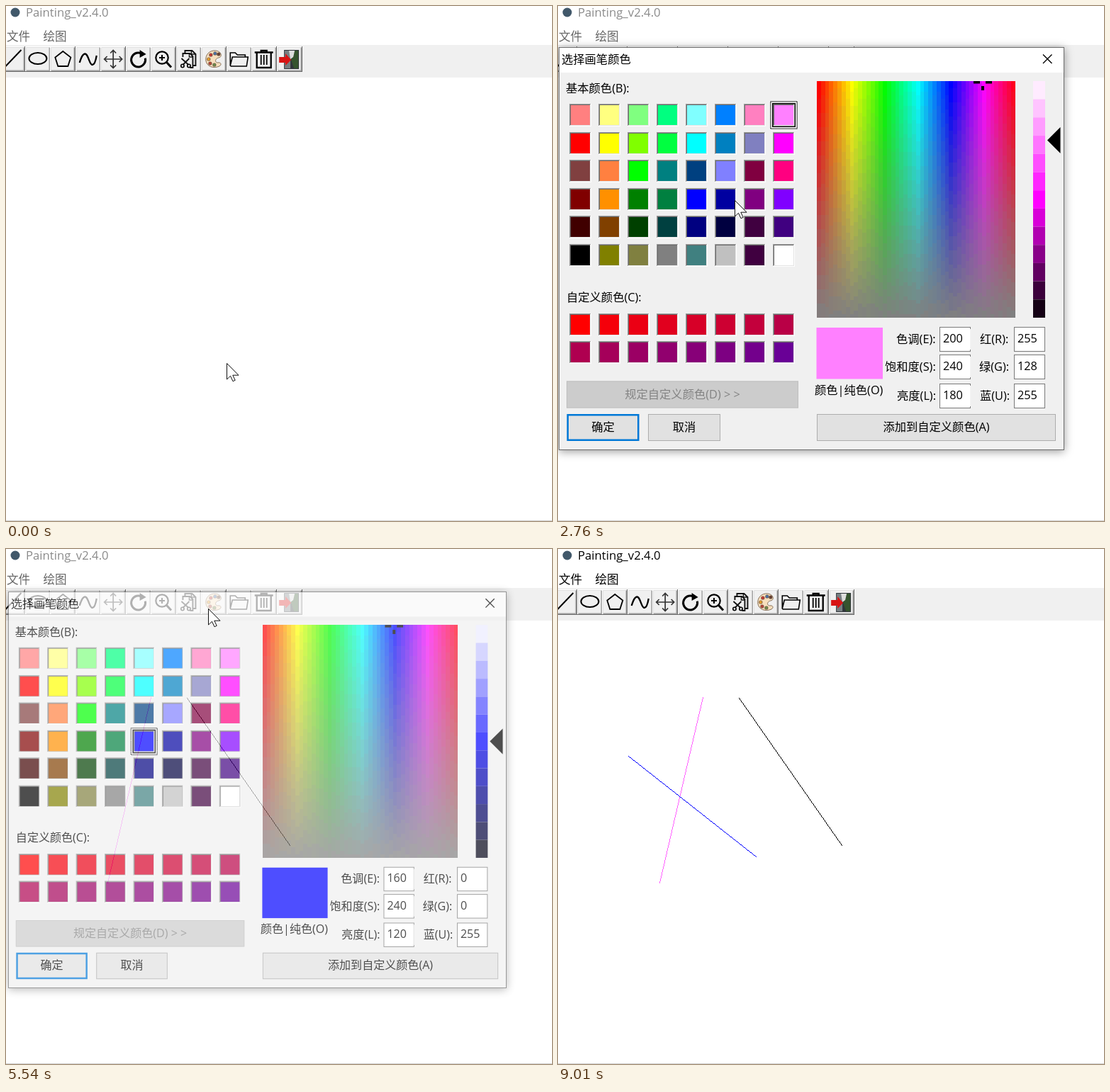
These frames come from a looping animation (770 by 727 pixels, 9390 ms). An HTML page with a canvas:

```html
<!DOCTYPE html>
<html lang="zh">
<head>
<meta charset="utf-8">
<title>Painting</title>
<style>
html, body { margin: 0; width: 100%; height: 100%; overflow: hidden; background: #fff; }
canvas { display: block; }
</style>
</head>
<body>
<canvas id="stage" width="770" height="727"></canvas>
<script>
const W = 770, H = 727, LOOP = 9390, STEP = LOOP / 75;
const FONT = "'Open Sans', 'Noto Sans CJK SC', 'Noto Sans CJK', sans-serif";
const screen = document.getElementById('stage').getContext('2d');
const layer = newCanvas(W, H);
let g = screen;

function newCanvas(w, h) {
  const c = document.createElement('canvas');
  c.width = w;
  c.height = h;
  return c;
}

// ---------- drawing helpers ----------
function rect(x, y, w, h, fill) {
  g.fillStyle = fill;
  g.fillRect(x, y, w, h);
}
function frame(x, y, w, h, color, lw = 1) {
  g.strokeStyle = color;
  g.lineWidth = lw;
  g.strokeRect(x + lw / 2, y + lw / 2, w - lw, h - lw);
}
function text(s, x, y, color = '#000', size = 16.3, align = 'left') {
  g.font = size + 'px ' + FONT;
  g.textAlign = align;
  g.fillStyle = color;
  g.fillText(s, x, y);
}
function stroke(d, color = '#000', lw = 2) {
  g.strokeStyle = color;
  g.lineWidth = lw;
  g.stroke(new Path2D(d));
}
function shape(d, fill) {
  g.fillStyle = fill;
  g.fill(new Path2D(d));
}
function dot(x, y, r, fill) {
  g.fillStyle = fill;
  g.beginPath();
  g.arc(x, y, r, 0, 7);
  g.fill();
}
function ring(x, y, r, lw, from = 0, to = 2 * Math.PI) {
  g.strokeStyle = '#000';
  g.lineWidth = lw;
  g.beginPath();
  g.arc(x, y, r, from, to);
  g.stroke();
}
// One square per step, without smoothing
function pixelLine([x0, y0], [x1, y1], color) {
  const n = Math.max(Math.abs(x1 - x0), Math.abs(y1 - y0), 1);
  for (let i = 0; i <= n; i++) {
    rect(Math.round(x0 + (x1 - x0) * i / n), Math.round(y0 + (y1 - y0) * i / n), 1, 1, color);
  }
}

// ---------- toolbar: each icon is centred on 0,0 ----------
const icons = [
  () => stroke('M-11 11L12 -13'),
  () => { g.beginPath(); g.ellipse(0, -1, 12.5, 8, 0, 0, 7); g.strokeStyle = '#000'; g.lineWidth = 2; g.stroke(); },
  () => stroke('M0 -11L11 -2.5L7 10H-7L-11 -2.5Z', '#000', 1.8),
  () => stroke('M-12 5C-9 -5 -6 -9 -3 -7C1 -4 2 8 6 8C9 8 11 1 12 -5', '#000', 2.3),
  () => {
    for (let i = 0; i < 4; i++) {
      stroke('M0 0V-12M-4 -8.5L0 -12.5L4 -8.5', '#333', 1.7);
      g.rotate(Math.PI / 2);
    }
  },
  () => { ring(0, 1, 10, 3, -0.25, 5.2); shape('M2 -13L11 -7L2 -2Z', '#000'); },
  () => { ring(-2, -2, 8.7, 2.2); stroke('M-6 -2H2M-2 -6V2', '#000', 2); stroke('M4 4L11 11.5', '#000', 3); },
  () => {
    stroke('M-5 -7V-12H5L10 -7V9H7M-8 -3V-8H2L6 -4V12H2', '#111', 1.9);
    stroke('M4 -12V-7H10M1 -8V-3H6', '#111', 1.4);
    stroke('M-10 -1L0 8M1 -1L-8 8', '#111', 1.8);
    ring(-8.5, 9.5, 2.2, 1.6);
    ring(0.5, 9.5, 2.2, 1.6);
  },
  () => {
    const blob = 'M3 -12C-6 -13 -12 -6 -11 2C-10 10 -1 14 8 10C12 8 10 4 6 5C1 5 2 -1 7 -2C13 -3 11 -11 3 -12Z';
    shape(blob, palettePressed ? '#ffe872' : '#f7dfbd');
    stroke(blob, '#86715b', 1);
    [['#4a72a8', 2, -8], ['#c83c32', -4, -6], ['#e6a02c', -7, 0], ['#b84538', -5, 6],
     ['#6d8c48', 1, 8], ['#684030', 7, -7]].forEach(([c, x, y]) => {
      dot(x, y, 2.6, '#6a5547');
      dot(x, y, 1.9, palettePressed && c !== '#4a72a8' ? '#f5cc20' : c);
    });
  },
  () => stroke('M-12 9V-9H-5L-2 -6H9V-3M-12 9L-9 -3H13L11 10H-11Z', '#000', 1.6),
  () => {
    stroke('M-13 -9.5H13', '#000', 2.5);
    stroke('M-4 -10V-12H4V-10M-10 -9V12H10V-9', '#000', 2.3);
    stroke('M-4 -6V8M0 -6V8M4 -6V8', '#000', 1.8);
  },
  () => {
    rect(-7, -13, 21, 27, '#30353a');
    rect(-6, -12, 8, 25, '#777f82');
    shape('M2 -12H13V13H7L2 -2Z', '#35542e');
    shape('M0 -12H8L6 -3L2 0Z', '#dedede');
    shape('M-14 -3H-5V-8L3 1L-5 9V5H-14Z', '#d81414');
  }
];
let palettePressed = false;

function toolbar() {
  rect(0, 55, W, 46, '#f0f0f0');
  icons.forEach((icon, i) => {
    const x = Math.round(-9 + 35.5 * i), down = palettePressed && i === 8;
    rect(x, 57, 36, 36, down ? '#fff' : '#696969');
    rect(x, 57, 35, 35, down ? '#696969' : '#fff');
    rect(x + 1.5, 58.5, 33.5, 33.5, down ? '#f0f0f0' : '#a0a0a0');
    rect(x + 1.5, 58.5, 32, 32, '#f0f0f0');
    g.save();
    g.translate(9.5 + 35.42 * i + (down ? 2 : 0), 75 + (down ? 1.5 : 0));
    icon();
    g.restore();
  });
}

function mainWindow(titleOn, menuOn) {
  rect(0, 0, W, H, '#fff');
  dot(13, 9, 6.5, '#41586a');
  text('Painting_v2.4.0', 28, 15, titleOn ? '#000' : '#8a8a8a', 16.7);
  text('文件', 1, 49, menuOn ? '#000' : '#666', 16.6);
  text('绘图', 52.5, 49, menuOn ? '#000' : '#666', 16.6);
  toolbar();
  rect(0, 726, W, 1, '#d4d4d4');
}

// ---------- colour dialog ----------
// One digit per channel, in sixteenths
const basic = ('f88 ff8 8f8 0f8 8ff 08f f8c f8f f00 ff0 8f0 0f4 0ff 08c 88c f0f ' +
  '844 f84 0f0 088 048 88f 804 f08 800 f90 080 084 00f 00a 808 80f ' +
  '400 840 040 044 008 004 404 408 000 880 884 888 488 ccc 404 fff').split(' ').map(code =>
  'rgb(' + [...code].map(d => d === 'f' ? 255 : parseInt(d, 16) * 16) + ')');

const spectrum = makeSpectrum();
// Saturation falls in steps that start at a different height in each column
function makeSpectrum() {
  const cols = 48, rows = 67, steps = 16, c = newCanvas(cols, rows), p = c.getContext('2d');
  for (let x = 0; x < cols; x++) {
    const hue = x / cols * 6;
    const phase = Math.abs(Math.sin(x * 12.9898) * 43758.5453) % 1;
    for (let y = 0; y < rows; y++) {
      const stepped = (Math.floor((1 - y / rows) * steps + phase) + 0.5 - phase) / steps;
      const sat = Math.max(0, Math.min(1, stepped));
      const rgb = [0, 4, 2].map(k => {
        const v = Math.max(0, Math.min(1, Math.abs((hue + k) % 6 - 3) - 1));
        return Math.round(255 * (0.5 + (v - 0.5) * sat));
      });
      p.fillStyle = 'rgb(' + rgb + ')';
      p.fillRect(x, y, 1, 1);
    }
  }
  return c;
}

function swatch(x, y, color) {
  rect(x, y, 31, 32, '#fff');
  rect(x, y, 30, 31, '#a0a0a0');
  rect(x + 1, y + 1, 29, 30, '#e3e3e3');
  rect(x + 1, y + 1, 28, 29, '#696969');
  rect(x + 2, y + 2, 27, 28, color);
}
function button(label, x, y, w, h, face = '#e1e1e1', edge = '#adadad', ink = '#000', lw = 1) {
  rect(x, y, w, h, face);
  frame(x, y, w, h, edge, lw);
  text(label, x + w / 2, y + 24, ink, 16.3, 'center');
}
function field(label, lx, x, y, w, value) {
  text(label, lx, y + 23);
  rect(x, y, w, 35, '#fff');
  frame(x, y, w, 35, '#7a7a7a');
  text(value, x + 5, y + 22);
}

const BLUE = { cell: 28, hue: 160, lum: 120, css: '#00f', rgb: [0, 0, 255] };
const PINK = { cell: 7, hue: 200, lum: 180, css: '#ff80ff', rgb: [255, 128, 255] };

function dialogBody(pick, focused) {
  g.save();
  g.shadowColor = 'rgba(0,0,0,.4)';
  g.shadowBlur = 12;
  g.shadowOffsetY = 2;
  rect(1, 58, 713, 569, '#f0f0f0');
  g.restore();
  rect(1, 58, 713, 36, '#fff');
  frame(1, 58, 713, 569, '#6b6b6b');
  text('选择画笔颜色', 5, 81);
  stroke('M684 68.5L696.5 81M696.5 68.5L684 81', '#000', 1.4);

  text('基本颜色(B):', 11, 122);
  basic.forEach((c, i) => {
    const x = Math.round(16.2 + 40.9 * (i % 8)), y = Math.round(138 + 39.5 * (i >> 3));
    swatch(x, y, c);
    if (i !== pick.cell) return;
    frame(x - 1, y - 1, 33, 34, '#000', 1.5);
    if (focused) {
      g.setLineDash([1, 1]);
      frame(x - 4, y - 4, 39, 40, '#000', 1.5);
      g.setLineDash([]);
    }
  });
  text('自定义颜色(C):', 12, 417);
  for (let i = 0; i < 16; i++) {
    swatch(Math.round(16.2 + 40.9 * (i % 8)), 434 + 39 * (i >> 3), `rgb(${255 - 10 * i},0,${10 * i})`);
  }
  button('规定自定义颜色(D) > >', 12, 529.5, 327, 38, '#ccc', '#bfbfbf', '#838383');
  button('确定', 12.5, 576, 102, 38, '#e1e1e1', '#0078d7', '#000', 2.5);
  button('取消', 127, 576, 102, 38);
  button('添加到自定义颜色(A)', 365, 576, 337, 38);

  // Hue and saturation field
  g.imageSmoothingEnabled = false;
  g.drawImage(spectrum, 365, 106, 279.5, 334);
  const mx = Math.round(365 + pick.hue / 240 * 280);
  rect(mx - 12, 106, 9, 3.5, '#000');
  rect(mx + 5, 106, 9, 3.5, '#000');
  rect(mx - 1, 113, 4, 6, '#000');

  // Luminance bar
  const bands = 13;
  for (let i = 0; i < bands; i++) {
    rect(670, 106 + i * 334 / bands, 17, 334 / bands, `hsl(${pick.hue * 1.5},100%,${100 - (i + 0.5) / bands * 100}%)`);
  }
  const ly = 106 + 334 * (1 - pick.lum / 240);
  shape(`M690 ${ly}L708.5 ${ly - 18.5}V${ly + 18.5}Z`, '#000');

  rect(364.5, 454, 93.5, 72.5, pick.css);
  text('颜色|纯色(O)', 362, 548);
  [['色调(E):', 477, pick.hue, '红(R):', 595], ['饱和度(S):', 461, 240, '绿(G):', 594],
   ['亮度(L):', 478, pick.lum, '蓝(U):', 595]].forEach(([a, ax, v, b, bx], i) => {
    const y = [453, 492, 533][i];
    field(a, ax, 538, y, 44, v);
    rect(581, y + 3, 1, 29, '#f4f4f4');
    field(b, bx, 643, y, 44, pick.rgb[i]);
  });
}

function dialog([x, y, w, h, alpha], pick, focused) {
  g = layer.getContext('2d');
  g.clearRect(0, 0, W, H);
  g.save();
  g.translate(x, y);
  g.scale(w / 712, h / 569);
  g.translate(-1, -58);
  dialogBody(pick, focused);
  g.restore();
  g = screen;
  g.globalAlpha = alpha;
  g.drawImage(layer, 0, 0);
  g.globalAlpha = 1;
}

// ---------- timeline, in steps ----------
const path = [
  [0, 311, 504], [4, 14, 75], [5, 11, 69], [6, 11, 69], [7, 41, 79], [8, 150, 150],
  [9, 264, 232], [10, 265, 232], [11, 330, 322], [12, 393, 412], [13, 340, 240],
  [14, 291, 76], [15, 291, 76], [16, 307, 131], [18, 316, 145], [20, 316, 145],
  [27, 80, 596], [28, 80, 596], [30, 139, 483], [33, 204, 211], [34, 185, 290],
  [35, 143, 467], [36, 215, 280], [37, 300, 73], [38, 343, 74], [39, 348, 85],
  [42, 285, 84], [44, 285, 84], [51, 194, 272], [52, 194, 272], [56, 75, 592],
  [58, 94, 592], [62, 99, 292], [63, 140, 324], [64, 210, 380], [65, 279, 434],
  [66, 287, 432], [71, 610, 656]
];
const presses = [[10, 12], [14, 14], [19, 20], [27, 28], [34, 35], [41, 42], [52, 52], [56, 56], [63, 65]];
const strokes = [
  { from: [255, 210], to: [400, 418], start: 10, end: 12, color: '#000' },
  { from: [204, 209], to: [143, 471], start: 34, end: 35, color: '#ff60ff' },
  { from: [99, 292], to: [279, 434], start: 63, end: 65, color: '#00f' }
];
const visits = [
  { open: 15, close: 29, picked: 19, ok: 28, color: PINK },
  { open: 43, close: 57, picked: 52, ok: 56, color: BLUE }
];
const within = (n, a, b) => n >= a && n <= b;

function pointer(n) {
  if (within(n, 1, 3) || n > 71) return null;
  const i = path.findIndex(k => k[0] >= n), b = path[i], a = path[Math.max(0, i - 1)];
  const k = b[0] === a[0] ? 1 : (n - a[0]) / (b[0] - a[0]);
  return [1, 2].map(j => Math.round(a[j] + (b[j] - a[j]) * k));
}

function pose(n, v) {
  if (n === v.open) return [10, 66, 691, 550, 0.25];
  if (n === v.open + 1) return [3, 60, 702, 560, 0.69];
  if (n === v.close) return [6, 62, 698, 556, 0.6];
  if (n === v.close + 1) return [12, 68, 688, 547, 0.22];
  return [1, 58, 712, 569, 1];
}

function arrow(x, y) {
  const d = 'M.5 .5V23L5.5 18.3L9 25.8L12.2 24.3L8.8 17.2H17Z';
  g.save();
  g.translate(x, y);
  shape(d, '#fff');
  stroke(d, '#111', 1);
  g.restore();
}

function draw(n) {
  const visit = visits.find(v => within(n, v.open, v.close + 1));
  const active = n >= 7;
  palettePressed = within(n, 14, 15) || within(n, 42, 43);
  mainWindow(active && !(visit && n <= visit.close), active && !(visit && n < visit.close));

  const tip = pointer(n);
  strokes.forEach(s => {
    if (n >= s.start) pixelLine(s.from, n < s.end ? tip : s.to, s.color);
  });
  if (visit) dialog(pose(n, visit), n >= visit.picked ? visit.color : BLUE, n < visit.ok);
  if (!tip) return;
  arrow(...tip);
  if (presses.some(p => within(n, ...p))) dot(tip[0] + 1, tip[1] + 1, 17.5, 'rgba(255,250,0,.5)');
}

let shown = -1;
function tick() {
  const n = Math.floor((performance.now() % LOOP + 9) / STEP) % 75;
  if (n !== shown) draw(shown = n);
  requestAnimationFrame(tick);
}
tick();
</script>
</body>
</html>
```
